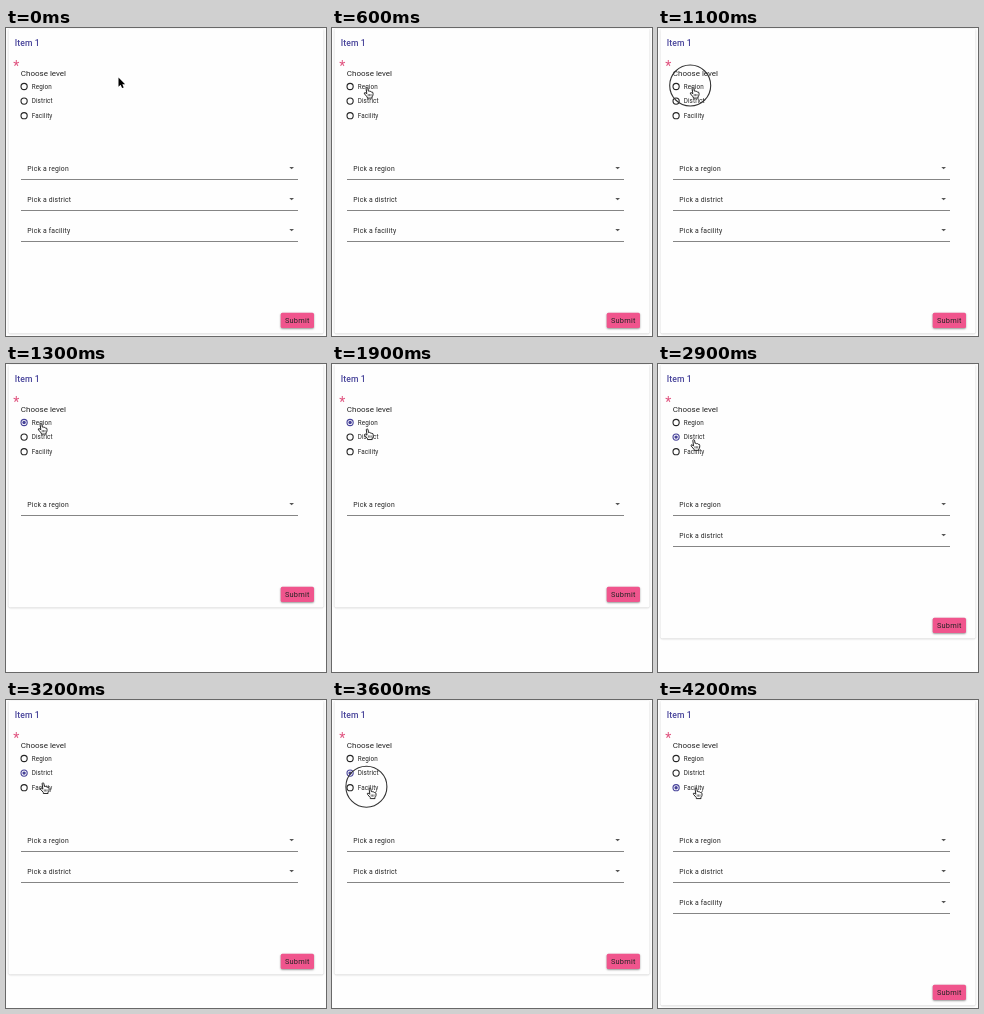
Animation of 320 by 308 pixels, one loop 4900 ms. Source, as an HTML page with a canvas:

```html
<!DOCTYPE html>
<html lang="en">
<head>
<meta charset="utf-8">
<style>
html, body { margin: 0; width: 100%; height: 100%; overflow: hidden; background: #fefefe; }
canvas { display: block; width: 320px; height: 308px; }
</style>
</head>
<body>
<canvas id="stage"></canvas>
<script>
const W = 320, H = 308, LOOP = 4900, STEP = 100;
const INDIGO = '#47439a', INK = '#252525', PINK = '#f0558d';
const LEVELS = ['Region', 'District', 'Facility'];

const canvas = document.getElementById('stage');
const ctx = canvas.getContext('2d');
const dpr = window.devicePixelRatio || 1;
canvas.width = W * dpr;
canvas.height = H * dpr;

// Pointer moves: start, end, from, to
const MOVES = [
  [0, 600, [112.5, 49.5], [35, 59.5]],
  [1700, 2200, [35, 59.5], [35.6, 75]],
  [2800, 3500, [35.6, 75], [38, 88]]
];
// Clicks: ring appears, choice applies, ring centre
const CLICKS = [
  [1100, 1300, 32.2, 57.5],
  [2300, 2500, 32.6, 72.8],
  [3600, 3800, 34.4, 86.7]
];

const ease = p => p * p * (3 - 2 * p);

function pointerAt(t) {
  let pos = MOVES[0][2];
  for (const [start, end, a, b] of MOVES) {
    if (t < start) break;
    const p = ease(Math.min(1, (t - start) / (end - start)));
    pos = [a[0] + (b[0] - a[0]) * p, a[1] + (b[1] - a[1]) * p];
  }
  return pos;
}

function text(str, x, y, size, { color = INK, weight = 400, spacing = 0 } = {}) {
  ctx.font = `${weight} ${size}px Roboto, sans-serif`;
  ctx.letterSpacing = `${spacing}px`;
  ctx.fillStyle = color;
  ctx.fillText(str, x, y);
}

function box(x, y, w, h, r, fill) {
  ctx.beginPath();
  ctx.roundRect(x, y, w, h, r);
  ctx.fillStyle = fill;
  ctx.fill();
}

function circle(x, y, r, stroke, width) {
  ctx.beginPath();
  ctx.arc(x, y, r, 0, Math.PI * 2);
  ctx.strokeStyle = stroke;
  ctx.lineWidth = width;
  ctx.stroke();
}

function shadow(color, blur, dy) {
  ctx.shadowColor = color;
  ctx.shadowBlur = blur * dpr;
  ctx.shadowOffsetY = dy * dpr;
}

function radio(label, y, on) {
  circle(18.1, y, 3.1, on ? INDIGO : INK, 1.1);
  if (on) {
    ctx.beginPath();
    ctx.arc(18.1, y, 1.7, 0, Math.PI * 2);
    ctx.fillStyle = INDIGO;
    ctx.fill();
  }
  text(label, 25.7, y + 2.3, 6.3, { spacing: 0.13 });
}

function select(label, y) {
  text(label, 21.3, y + 2.5, 6.8, { spacing: 0.2 });
  ctx.beginPath();
  ctx.moveTo(283.3, y - 1);
  ctx.lineTo(288, y - 1);
  ctx.lineTo(285.65, y + 1.3);
  ctx.fillStyle = '#555';
  ctx.fill();
  ctx.fillStyle = '#858585';
  ctx.fillRect(15, y + 11, 277, 1);
}

function form(level) {
  const rows = level < 0 ? 3 : level + 1;
  const bottom = 243.5 + (rows - 1) * 31;

  ctx.fillStyle = '#fefefe';
  ctx.fillRect(0, 0, W, H);
  shadow('rgba(0,0,0,0.22)', 2, 0.6);
  box(2.5, 0.5, 315, bottom - 0.5, 2, '#fefefe');
  shadow('transparent', 0, 0);

  text('Item 1', 8.7, 18, 8.6, { color: INDIGO, weight: 500, spacing: 0.1 });
  text('*', 7.2, 43, 14, { color: '#e0537f' });
  text('Choose level', 14.8, 48, 8);
  LEVELS.forEach((name, i) => radio(name, 58.5 + i * 14.6, i === level));
  for (let i = 0; i < rows; i++) select('Pick a ' + LEVELS[i].toLowerCase(), 140 + i * 31);

  const top = bottom - 20.7;
  shadow('rgba(0,0,0,0.4)', 2, 0.8);
  box(274.7, top, 33.3, 15.3, 1.6, PINK);
  shadow('transparent', 0, 0);
  text('Submit', 278.9, top + 10.1, 7.4, { spacing: 0.25 });
}

function arrow(x, y) {
  ctx.save();
  ctx.translate(x, y);
  const p = new Path2D('M0 0V9.2L2.1 7.3L3.6 10.6L5.2 9.9L3.8 6.7H6.6Z');
  ctx.lineJoin = 'round';
  ctx.strokeStyle = '#fff';
  ctx.lineWidth = 1.4;
  ctx.stroke(p);
  ctx.fillStyle = '#000';
  ctx.fill(p);
  ctx.restore();
}

function hand(x, y) {
  ctx.save();
  ctx.translate(x, y);
  const p = new Path2D('M-.9 .8Q-.8 -.2 .1 0Q.8 .1 .9 1L1.3 3.6Q2.3 3 2.9 4Q4 3.5 4.5 4.5' +
    'Q6 4.2 6 5.8V7.3Q5.8 8.6 5 9.4V10.6H.3V9.6L-2.5 6.4Q-3.1 5.2 -2 5L-.2 6.2Z');
  ctx.fillStyle = '#fff';
  ctx.fill(p);
  ctx.lineJoin = 'round';
  ctx.strokeStyle = '#111';
  ctx.lineWidth = 0.9;
  ctx.stroke(p);
  ctx.lineWidth = 0.6;
  ctx.stroke(new Path2D('M1.2 6.5V8.7M2.6 6.5V8.7M4 6.5V8.7'));
  ctx.restore();
}

function draw(now) {
  const t = Math.floor((now % LOOP) / STEP) * STEP;
  ctx.setTransform(dpr, 0, 0, dpr, 0, 0);

  form(CLICKS.filter(c => t >= c[1]).length - 1);
  const [x, y] = pointerAt(t);
  (x < 47 ? hand : arrow)(x, y);
  for (const [start, end, cx, cy] of CLICKS) {
    if (t >= start && t < end) circle(cx, cy, 20.5, '#333', 1.1);
  }
}

function tick() {
  draw(performance.now());
  requestAnimationFrame(tick);
}
tick();
</script>
</body>
</html>
```
